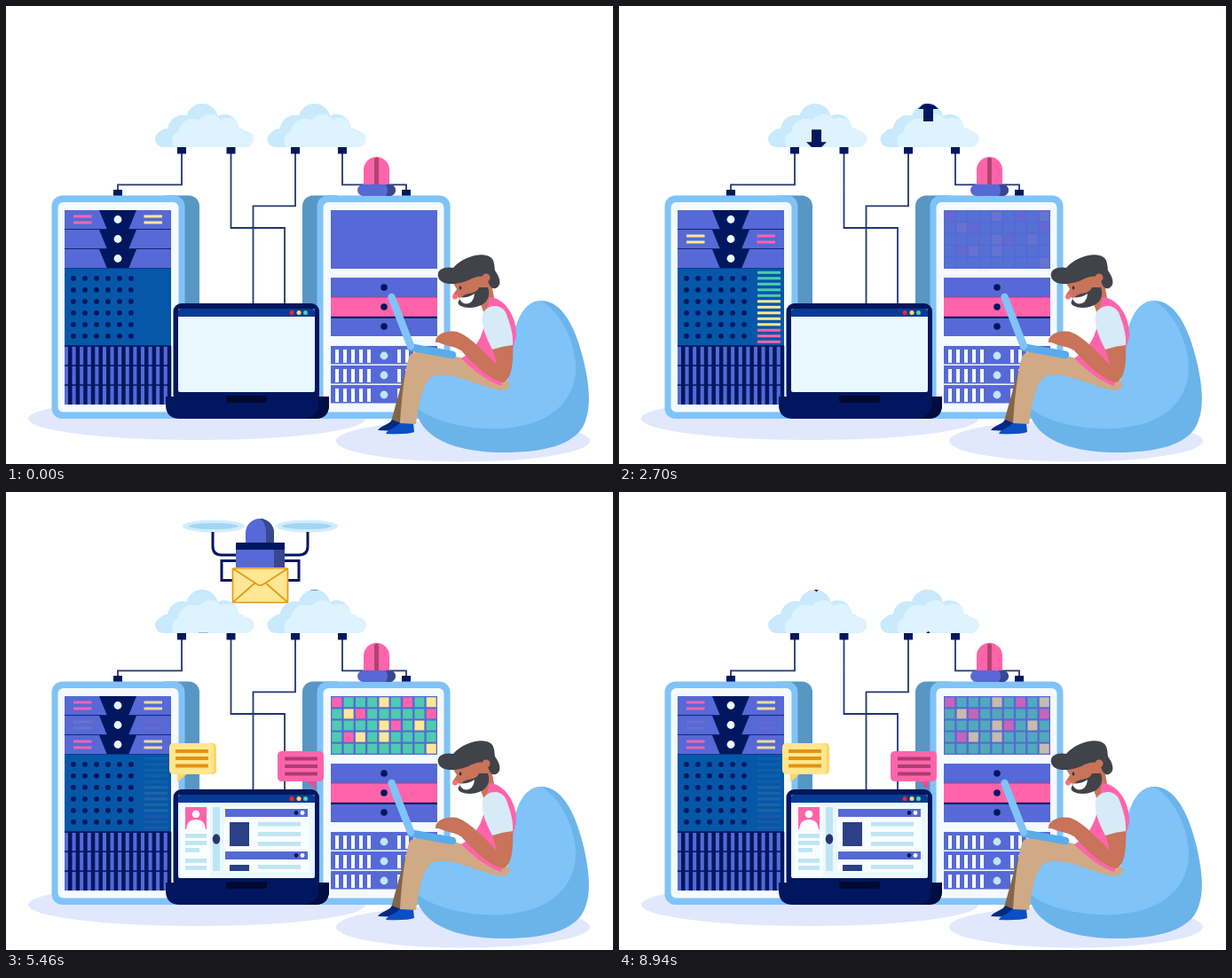
These frames come from a looping animation (684 by 516 pixels, 9000 ms). An HTML page:

```html
<!DOCTYPE html>
<html lang="en">
<head>
<meta charset="utf-8">
<title>Server room</title>
<style>
  html, body { margin: 0; width: 100%; height: 100%; overflow: hidden; background: #fff; }
  svg { display: block; width: 684px; height: 516px; }
  .navy { fill: #00175f; }
  .violet { fill: #5669d6; }
  .shade { fill: #39478f; }
  .pink { fill: #ff64ab; }
  .sky { fill: #7fc3f8; }
  .ice { fill: #bfe5f2; }
  .skin { fill: #c8735a; }
  .wire { fill: none; stroke: #24366f; stroke-width: 1.8; }
  .arm { fill: none; stroke: #00175f; stroke-width: 3; }
</style>
</head>
<body>
<svg viewBox="0 0 684 516">
  <defs>
    <g id="cloudShape">
      <rect x="168" y="141" width="111" height="18" rx="9"/>
      <circle cx="199" cy="140" r="17"/>
      <circle cx="221" cy="128" r="18"/>
      <circle cx="246" cy="138" r="16"/>
      <circle cx="262" cy="148" r="10.5"/>
      <circle cx="181" cy="148" r="10"/>
    </g>
    <clipPath id="cloudClip">
      <rect x="168" y="141" width="111" height="18" rx="9"/>
      <circle cx="199" cy="140" r="17"/>
      <circle cx="221" cy="128" r="18"/>
      <circle cx="246" cy="138" r="16"/>
      <circle cx="262" cy="148" r="10.5"/>
    </clipPath>
    <g id="cloud">
      <use href="#cloudShape" fill="#c9e9fd"/>
      <g clip-path="url(#cloudClip)" fill="#ddf3fe">
        <rect x="187" y="142" width="95" height="20" rx="9"/>
        <circle cx="211" cy="144" r="17"/>
        <circle cx="230" cy="137" r="15"/>
        <circle cx="250" cy="141" r="15"/>
        <circle cx="264" cy="150" r="11"/>
      </g>
    </g>
  </defs>

  <g fill="#e1e8fd">
    <ellipse cx="215" cy="465" rx="190" ry="24"/>
    <ellipse cx="515" cy="490" rx="143" ry="23.5"/>
  </g>

  <g id="drone">
    <g fill="#d0edfd">
      <ellipse cx="234" cy="38.5" rx="35" ry="7"/>
      <ellipse cx="339" cy="38.5" rx="35" ry="7"/>
    </g>
    <g fill="#a3d5f3">
      <ellipse cx="234" cy="38.5" rx="28" ry="3.4"/>
      <ellipse cx="339" cy="38.5" rx="28" ry="3.4"/>
    </g>
    <path class="arm" d="M233 45V61Q233 71 243 71H330Q340 71 340 61V45M259 77.500H243V99.500H256M314 77.500H330V99.500H317"/>
    <path class="violet" d="M270 58V46A16 16 0 0 1 302 46V58Z"/>
    <path class="shade" d="M286 30A16 16 0 0 1 302 46V58H293V46Q293 34 286 30Z"/>
    <rect class="violet" x="259" y="65" width="55" height="20"/>
    <rect class="shade" x="302" y="65" width="12" height="20"/>
    <rect class="navy" x="259" y="57" width="55" height="8"/>
    <g stroke="#e39a17" stroke-width="1.700" fill="none" stroke-linejoin="round">
      <rect x="255.500" y="86" width="62" height="38.500" rx="1" fill="#ffe795"/>
      <path d="M256 124 281 102M317 124 292 102M256 86.500 283 104Q286.500 106.500 290 104L317 86.500"/>
    </g>
  </g>

  <use href="#cloud"/>
  <use href="#cloud" x="126.500"/>
  <g clip-path="url(#cloudClip)">
    <path id="down" class="navy" d="M222.500 0 211 -11H217V-25H228V-11H234Z"/>
  </g>
  <g transform="translate(126.500)"><g clip-path="url(#cloudClip)">
    <path id="up" class="navy" d="M222 0 210.500 11H216.500V25H227.500V11H233.500Z"/>
  </g></g>

  <path class="wire" d="M198 165V201.300H126V209M253.500 165V250H314V336M326 165V225.300H278.500V336M379 165V201.300H451V209"/>
  <g id="plugs" class="navy"></g>

  <g id="leftRack"></g>
  <g id="rightRack"></g>

  <g>
    <path class="pink" d="M403 202V184.500A14.500 14.500 0 0 1 432 184.500V202Z"/>
    <path fill="#b0436f" d="M415 202V172Q417.500 169 420 172V202Z"/>
    <rect class="violet" x="396" y="201" width="43" height="13" rx="6.500"/>
    <path class="shade" d="M428 201H432.500A6.500 6.500 0 0 1 432.500 214H428Q432 207.500 428 201Z"/>
  </g>

  <g>
    <rect class="navy" x="188.500" y="335" width="164.500" height="112" rx="9"/>
    <rect x="194" y="341" width="154" height="94" rx="2" fill="#eaf9ff"/>
    <path fill="#083b93" d="M194 350V344Q194 341 197 341H345Q348 341 348 344V350Z"/>
    <circle cx="322" cy="345.500" r="2.500" fill="#ee2737"/>
    <circle cx="330" cy="345.500" r="2.500" fill="#ffdc5c"/>
    <circle cx="337.500" cy="345.500" r="2.500" fill="#5ccbb3"/>
    <g id="profile"></g>
    <g id="feed"></g>
    <path class="navy" d="M180 440H364V449Q364 465 348 465H196Q180 465 180 449Z"/>
    <path fill="#000d40" d="M352 440H364V449Q364 465 348 465H336Q352 462 352 449Z"/>
    <path fill="#000a30" d="M248 439H294V444Q294 447 291 447H251Q248 447 248 444Z"/>
  </g>

  <g id="bubbleLeft">
    <path fill="#ffe68f" d="M189 283H232Q237 283 237 288V313Q237 318 232 318H203L193 327V318H189Q184 318 184 313V288Q184 283 189 283Z"/>
    <path fill="#ffd667" d="M232 283Q237 283 237 288V313Q237 318 232 318H229Q234 318 234 313V288Q234 283 229 283ZM193 318H203L193 327Z"/>
    <path stroke="#e3940f" stroke-width="4" d="M191 292H228M191 300H228M191 308.500H228"/>
  </g>
  <g id="bubbleRight">
    <path class="pink" d="M311 292H353Q358 292 358 297V321Q358 326 353 326H349V335L339 326H311Q306 326 306 321V297Q306 292 311 292Z"/>
    <path fill="#e44f94" d="M339 326H349V335Z"/>
    <path stroke="#ad3d70" stroke-width="4" d="M314 300.500H351M314 309H351M314 317.500H351"/>
  </g>

  <g>
    <path fill="#6bb4ea" d="M566 420C568 365 580 332 603 332C626 332 641 360 650 396C659 432 659 455 651 472C640 495 604 503 562 503C514 503 470 491 462 456C460 434 466 418 482 412L560 430Z"/>
    <path class="sky" d="M566 420C568 365 580 332 603 332C630 348 648 392 640 424C630 458 600 473 560 476C520 478 480 468 462 452C460 434 466 418 482 412L560 430Z"/>
    <path fill="#846548" d="M450 410 434 468 446 471 458 430Z"/>
    <path fill="#04297f" d="M419 478C423 472 432 472 435 466L445 470 443 479Z"/>
    <path fill="#0b4fc4" d="M428 482C430 476 440 476 444 469L459 470 460 480Q452 483 428 482Z"/>
    <path fill="#d0a985" d="M454 396C458 386 475 388 500 393Q545 404 568 425Q567 433 558 433C535 430 508 413 484 416C470 420 466 445 462 471L444 470C446 440 449 412 454 396Z"/>
    <path class="skin" d="M530 322 547 312 552 340 540 350Z"/>
    <path class="pink" d="M545 328C562 329 576 350 575 372L570 390 558 428C544 424 526 410 513 397C530 386 539 372 541 345Z"/>
    <path class="skin" d="M548 386 571 381C572 402 570 421 560 424C544 421 524 401 511 386C500 383 488 381 484 376C487 369 496 365 508 367C522 371 540 391 553 404Z"/>
    <path fill="#d6ebf5" d="M537 347C542 336 557 335 563 345C568 358 572 370 571 382Q560 383 548 387C541 373 535 360 537 347Z"/>
    <path class="skin" d="M503 311 544 298 548 314 541 330 513 336 510 328Q504 328 504 325L508 319Z"/>
    <path fill="#404349" d="M511 331C518 320 529 327 533 317L543 317C547 328 541 339 523 340C511 340 507 335 511 331Z"/>
    <path fill="#fff" d="M511 328.500Q521 329 528 324Q527 335.500 518 335.500Q512 334.500 511 328.500Z"/>
    <circle cx="506" cy="327.500" r="3" fill="#ff6d80"/>
    <ellipse cx="512" cy="317.500" rx="1.300" ry="2" fill="#303238"/>
    <path fill="#404349" d="M487 305C485 297 494 293 504 295C514 283 536 276 546 283C551 287 550 293 551 298C557 306 559 315 552 318C545 320 544 311 541 305Q531 303 521 309C505 315 490 315 487 305Z"/>
    <circle class="skin" cx="541" cy="306" r="4.500"/>
    <g fill="none" stroke-width="8.500" stroke-linecap="round">
      <path stroke="#5aabea" d="M456 384.500 503 393"/>
      <path stroke="#7fc3f8" d="M434.500 328 456 383"/>
    </g>
    <path class="skin" d="M484 377Q492 365 508 367L520 374 512 388Q498 378 484 379Z"/>
  </g>
</svg>

<script>
const LOOP = 9000;
const $ = id => document.getElementById(id);
const repeat = (n, make) => Array.from({ length: n }, (_, i) => make(i)).join('');
const rect = (x, y, w, h, attrs) => `<rect x="${x}" y="${y}" width="${w}" height="${h}" ${attrs}/>`;
const dot = (x, y, r, attrs) => `<circle cx="${x}" cy="${y}" r="${r}" ${attrs}/>`;
const fill = color => `fill="${color}"`;
const cls = name => `class="${name}"`;
const PINK = '#ff64ab', YELLOW = '#ffe795', TEAL = '#4fcbb0';

function cabinet(x, sideX) {
  return rect(sideX, 213.5, 50, 251, 'rx="12" fill="#5897c4"') +
    rect(x, 213.5, 150, 251.5, 'rx="12" class="sky"') +
    rect(x + 7, 221, 136, 236.5, 'rx="6" fill="#f4faff"');
}

function statusLights(y, left, right) {
  const pair = (x, color) => rect(x, y + 5.5, 20.5, 3, fill(color)) + rect(x, y + 12.5, 20.5, 3, fill(color));
  return pair(76, left) + pair(155.5, right);
}

function buildLeftRack() {
  const unit = i => {
    const y = 230 + i * 22;
    return rect(66, y, 120, 22, cls('violet')) +
      `<path class="navy" d="M105 ${y}H147L138 ${y + 22}H114Z"/>` +
      rect(66, y + 21.2, 120, 1.8, cls('navy')) + dot(126, y + 10.5, 4.4, fill('#eef9ff'));
  };
  const barColor = i => [TEAL, YELLOW, PINK][Math.floor(i / 5)];
  $('leftRack').innerHTML = cabinet(51.5, 168) +
    repeat(3, unit) +
    rect(66, 295.5, 120, 87.5, fill('#0657a8')) +
    repeat(36, i => dot(76 + i % 6 * 13, 306.8 + Math.floor(i / 6) * 13, 2.9, cls('navy'))) +
    rect(66, 383, 120, 66, cls('violet')) +
    repeat(14, i => rect(70 + i * 8.6, 383, 4.5, 66, cls('navy'))) +
    repeat(3, i => rect(66, 382.3 + i * 22, 120, 1.6, cls('navy'))) +
    `<g id="rowTop">${statusLights(230, PINK, YELLOW)}</g>` +
    `<g id="rowBottom">${statusLights(274, PINK, YELLOW)}</g>` +
    `<g id="rowMiddle">${statusLights(252, YELLOW, PINK)}` +
    repeat(13, i => rect(156, 298.8 + i * 6.5, 26, 3, fill(barColor(i)))) + '</g>';
}

function buildRightRack() {
  const cells = ['p...y.p.y', '.yp.....p', '....yp.y.', '.py.y....', '........y'];
  const cellColor = { p: PINK, y: YELLOW, '.': TEAL };
  const drawer = i => {
    const y = 306 + i * 22;
    return rect(366, y, 120, 22, cls(i === 1 ? 'pink' : 'violet')) + dot(426, y + 11, 3.8, cls('navy'));
  };
  const slots = i => {
    const y = 383 + i * 22;
    return rect(366, y, 120, 20.5, cls('violet')) + dot(426, y + 11, 4.4, fill('#bfe5f7')) +
      repeat(10, k => rect(371 + k % 5 * 9 + (k > 4 ? 70 : 0), y + 4, 4, 15, fill('#f4faff')));
  };
  $('rightRack').innerHTML = cabinet(350.5, 334) +
    rect(366, 230, 120, 66, cls('violet')) +
    '<g id="grid">' + cells.map((row, r) => [...row].map((c, k) =>
      rect(367.3 + k * 13.3, 231.3 + r * 13.1, 11, 11, fill(cellColor[c]))).join('')).join('') + '</g>' +
    repeat(3, drawer) + rect(366, 327.5, 120, 1, fill('#a83f93')) + rect(366, 349.8, 120, 2, cls('navy')) +
    repeat(3, slots);
}

function buildScreen() {
  const header = y => rect(247, y, 93, 9, cls('violet')) +
    dot(327, y + 4.5, 2.4, cls('navy')) + dot(334, y + 4.5, 2.4, fill('#fff'));
  const line = (x, y, w) => rect(x, y, w, 4.8, cls('ice'));
  $('profile').innerHTML = rect(197, 352, 33, 82, fill('#f8fdff')) +
    rect(202, 355, 24, 25, cls('pink')) + dot(214, 363, 4.3, fill('#fff')) +
    '<path fill="#fff" d="M203 380Q204 369 214 369T225 380Z"/>' +
    line(202, 385, 24) + line(202, 393, 24) + line(202, 401, 16) + line(202, 413, 24) + line(202, 421, 24) +
    rect(233, 355, 8, 72, cls('ice')) +
    '<ellipse cx="237" cy="391" rx="4.300" ry="5.800" fill="#26356f"/>';
  $('feed').innerHTML = rect(246, 354, 95, 74, fill('#f8fdff')) + header(357) + header(405) +
    rect(252, 372, 22, 27, fill('#2a4087')) + rect(252, 420, 22, 7, fill('#2a4087')) +
    line(284, 371.7, 48) + line(284, 383, 48) + line(284, 394, 48) + line(284, 420, 48);
}

$('plugs').innerHTML = [[193, 159], [248.5, 159], [321, 159], [374, 159], [121, 207], [446, 207]]
  .map(([x, y]) => rect(x, y, 10, 7.5, '')).join('');
buildLeftRack();
buildRightRack();
buildScreen();

const clamp = v => Math.min(1, Math.max(0, v));
const progress = (t, start, length) => clamp((t - start) / length);
const easeOut = v => 1 - (1 - v) ** 2;
const pulse = t => (1 + Math.cos(t * Math.PI / 300)) / 2;

// Time, x and y offsets of the drone from its hovering place.
const climb = [
  [2880, -400, 300], [3420, -174, 285], [4380, -28, 73], [4800, -1, -20],
  [5460, 0, 0], [6200, 0, -26], [6900, 0, -7]
];

function spline(keys, t, axis) {
  const i = Math.max(0, keys.findIndex((k, n) => n < keys.length - 1 && t <= keys[n + 1][0]));
  const slope = n => {
    const a = keys[Math.max(0, n - 1)], b = keys[Math.min(keys.length - 1, n + 1)];
    return (b[axis] - a[axis]) / (b[0] - a[0]);
  };
  const [a, b] = [keys[i], keys[i + 1]];
  const span = b[0] - a[0], u = (t - a[0]) / span;
  return a[axis] * (1 + 2 * u) * (1 - u) ** 2 + slope(i) * span * u * (1 - u) ** 2 +
    b[axis] * u * u * (3 - 2 * u) + slope(i + 1) * span * u * u * (u - 1);
}

function dronePlace(t) {
  if (t < 2880) return [-258 - (t - 1860) * 0.628, -46];
  if (t < 6900) return [spline(climb, t, 1), spline(climb, t, 2)];
  const u = (t - 6900) / 780;
  return [288 * u ** 1.9, -7 - 95 * u * u];
}

const show = (id, opacity) => $(id).setAttribute('opacity', opacity.toFixed(3));
const place = (id, x, y) => $(id).setAttribute('transform', `translate(${x.toFixed(2)} ${y.toFixed(2)})`);
const zoom = (id, x, y, scale) =>
  $(id).setAttribute('transform', `translate(${x} ${y}) scale(${scale.toFixed(3)}) translate(${-x} ${-y})`);

function draw(t) {
  place('drone', ...dronePlace(t));

  const travel = t < 1695 ? -5 : (t - 1695) % 2400 * 0.054;
  place('down', 0, 110 + travel);
  place('up', 0, 159.3 - travel);

  const blink = pulse(t);
  show('rowTop', blink);
  show('rowMiddle', 1 - blink);
  show('rowBottom', t < 300 ? 0 : blink);
  show('grid', t < 360 ? 0 : pulse(t - 60));

  show('profile', progress(t, 2960, 540));
  const feedIn = progress(t, 3180, 480);
  show('feed', feedIn);
  place('feed', 0, 12 * (1 - feedIn));

  zoom('bubbleLeft', 210.5, 305, easeOut(progress(t, 4200, 420)));
  zoom('bubbleRight', 332, 313, easeOut(progress(t, 4320, 420)));
}

const started = performance.now();
function tick() {
  draw((performance.now() - started) % LOOP);
  requestAnimationFrame(tick);
}
draw(0);
requestAnimationFrame(tick);
</script>
</body>
</html>
```
